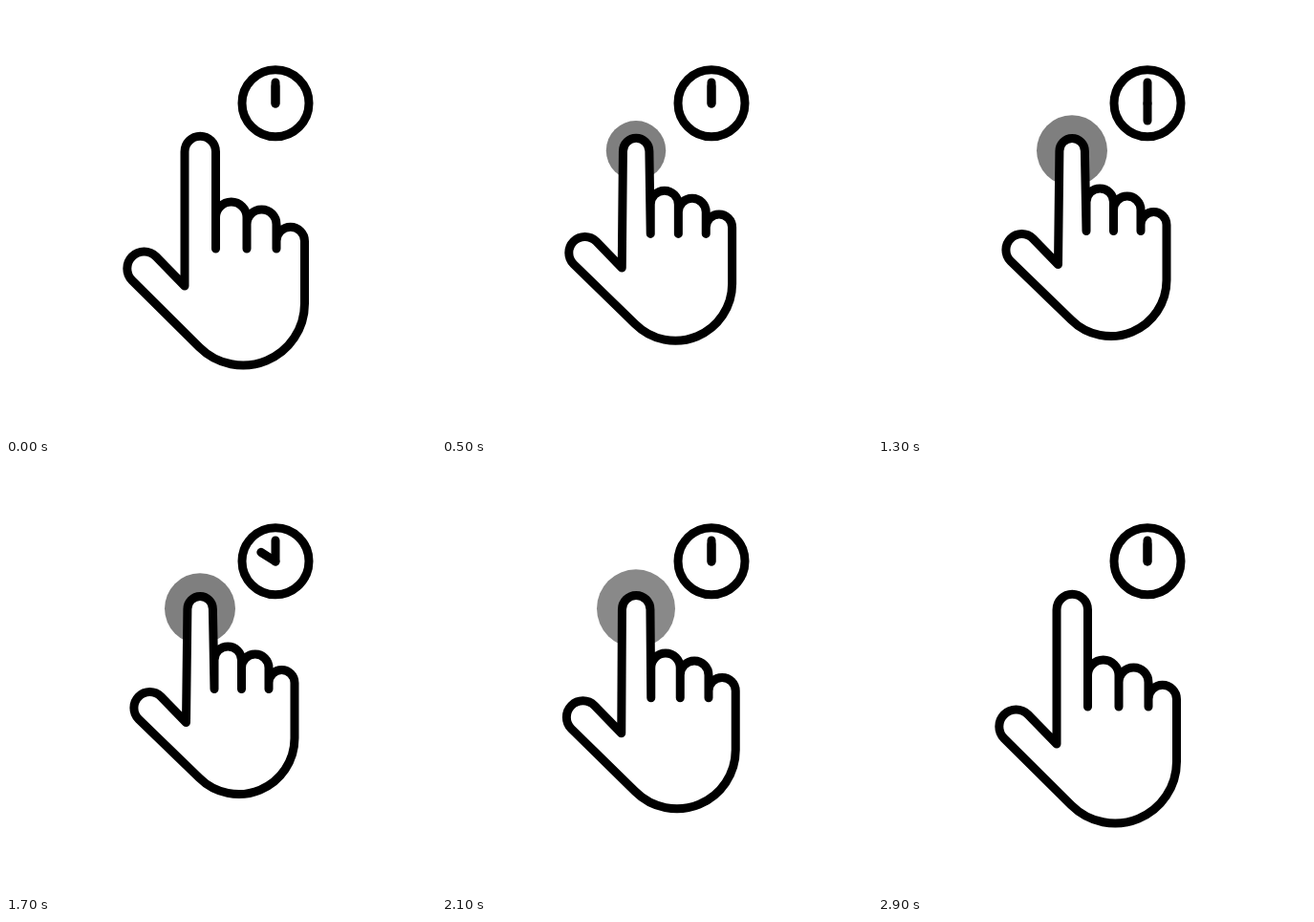
An HTML page that plays this animation: 450 by 450 pixels, repeating every 3 s.

```html
<!DOCTYPE html>
<html lang="en">
<head>
<meta charset="utf-8">
<title>Press and hold</title>
<style>
  html, body { margin: 0; width: 100%; height: 100%; overflow: hidden; background: #fff; }
  svg { display: block; width: 100%; height: 100%; }
  .line { fill: #fff; stroke: #000; stroke-width: 9; stroke-linecap: round; stroke-linejoin: round; }
</style>
</head>
<body>
<svg viewBox="0 0 450 450">
  <circle id="ripple" cx="203" cy="151.3" r="0"/>
  <path id="hand" class="line"/>
  <circle class="line" cx="282" cy="101.8" r="35"/>
  <path class="line" d="M282 80V102"/>
  <path id="pointer" class="line" d="M282 102V84"/>
</svg>
<script>
const LOOP = 3000, STEP = 100;
const [ripple, hand, pointer] = ['ripple', 'hand', 'pointer'].map(id => document.getElementById(id));

// Each measure of the hand as [relaxed, pressed].
const pose = {
  baseX: [187, 188.5], baseY: [293, 270.5],
  tipL: [187, 189.9], tipR: [219.5, 216.4], tipY: [152.5, 151.8],
  x1: [219.5, 218], x2: [252, 246.5], x3: [283, 275], x4: [312.5, 302],
  foldY: [254, 235.5], k1: [221.3, 205.2], k2: [228.5, 213.3], k3: [246, 229],
  palmY: [311.5, 287], palmR: [64.5, 58.5],
  thumbX: [144.5, 150.5], thumbY: [274.8, 255.2], thumbR: [17.7, 16.6]
};

const progress = (t, from, to) => Math.min(1, Math.max(0, (t - from) / (to - from)));
const smooth = u => u * u * (3 - 2 * u);
const ease = (t, from, to) => smooth(progress(t, from, to));
const arc = (r, x, y) => `A${r} ${r} 0 0 1 ${x} ${y}`;

function handPath(press) {
  const p = {};
  for (const key in pose) p[key] = pose[key][0] + (pose[key][1] - pose[key][0]) * press;
  const knuckle = (from, to, y) => `V${y}` + arc((to - from) / 2, to, y);
  const palmD = p.palmR * Math.SQRT1_2, thumbD = p.thumbR * Math.SQRT1_2;
  return `M${p.baseX} ${p.baseY}L${p.tipL} ${p.tipY}` +
    arc((p.tipR - p.tipL) / 2, p.tipR, p.tipY) +
    `L${p.x1} ${p.foldY}` + knuckle(p.x1, p.x2, p.k1) +
    `V${p.foldY}` + knuckle(p.x2, p.x3, p.k2) +
    `V${p.foldY}` + knuckle(p.x3, p.x4, p.k3) +
    `V${p.palmY}` + arc(p.palmR, p.x4 - p.palmR - palmD, p.palmY + palmD) +
    `L${p.thumbX - thumbD} ${p.thumbY + thumbD}` +
    arc(p.thumbR, p.thumbX + thumbD, p.thumbY - thumbD) + 'Z';
}

function draw(t) {
  const down = ease(t, 200, 600), up = ease(t, 1900, 2300);
  hand.setAttribute('d', handPath(down - up));

  ripple.setAttribute('r', 37 * down + 8 * up);
  ripple.setAttribute('opacity', 0.5 * (1 - ease(t, 2050, 2350)));

  const u = progress(t, 580, 2020);
  const turn = 0.35 * u + 0.65 * smooth(u);
  pointer.setAttribute('transform', `rotate(${360 * turn} 282 102)`);
}

function tick() {
  draw(Math.floor(performance.now() % LOOP / STEP) * STEP);
  requestAnimationFrame(tick);
}
tick();
</script>
</body>
</html>
```
